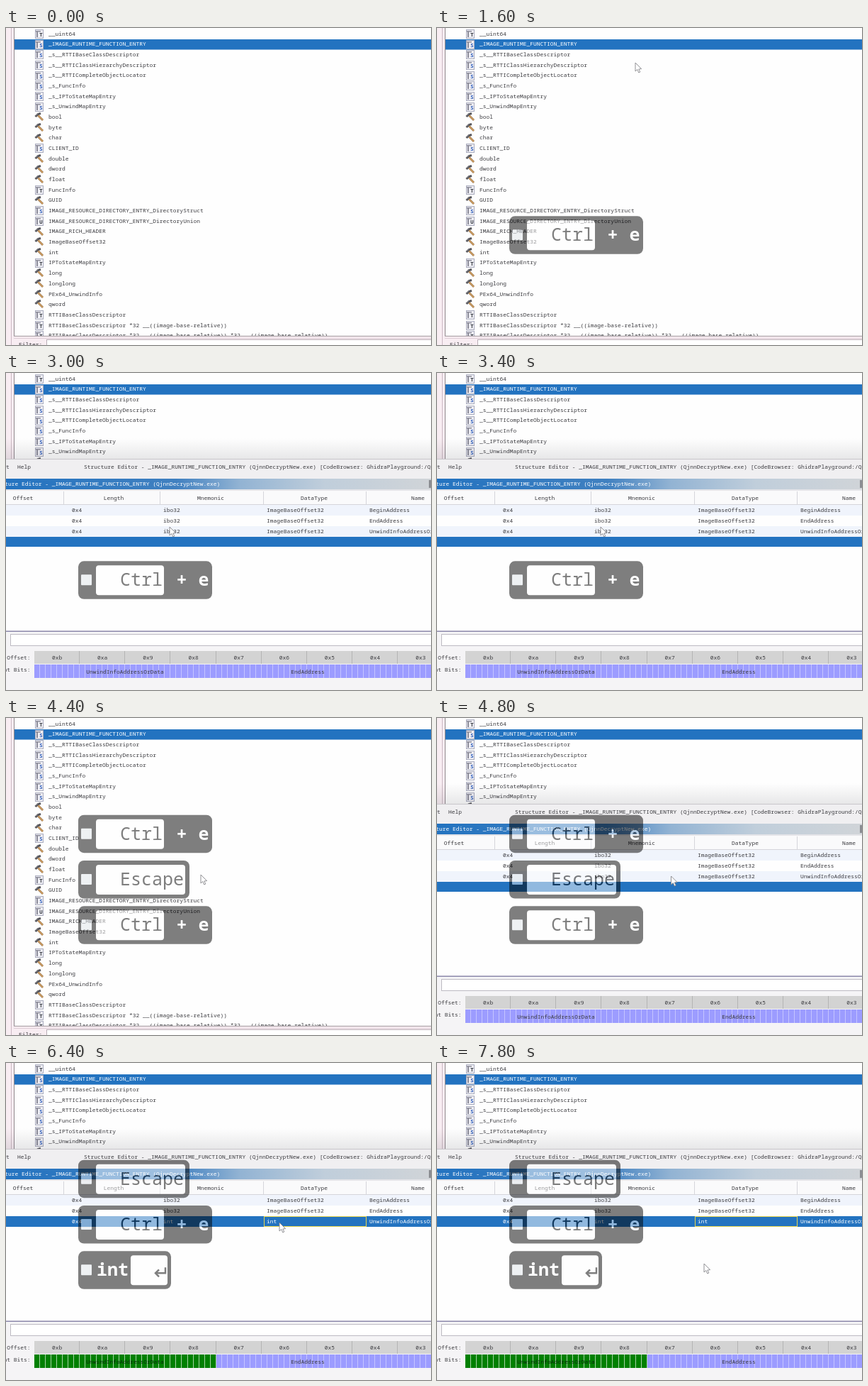
Recreate the animation shown at these times as an HTML page with a canvas. Size 600x447 px, loop 8000 ms.

```html
<!DOCTYPE html>
<html lang="en">
<head>
<meta charset="utf-8">
<title>Structure editor</title>
<style>
html, body { margin: 0; width: 100%; height: 100%; overflow: hidden; background: #fff; }
canvas { display: block; }
</style>
</head>
<body>
<canvas id="stage" width="600" height="447"></canvas>
<script>
const W = 600, H = 447, LOOP = 8000, STEP = 200;
const stage = document.getElementById('stage').getContext('2d');
const layer = document.createElement('canvas');
layer.width = W;
layer.height = H;
const overlay = layer.getContext('2d');
let ctx = stage;

const MONO = '"Noto Sans Mono", "DejaVu Sans Mono", monospace';
const BLUE = '#2373c0', INK = '#3c3c40', PITCH = 14.67;

// Icon letter (or h for a hammer), then the type name
const TYPES = `T __uint64
S _IMAGE_RUNTIME_FUNCTION_ENTRY
S _s__RTTIBaseClassDescriptor
S _s__RTTIClassHierarchyDescriptor
S _s__RTTICompleteObjectLocator
S _s_FuncInfo
S _s_IPToStateMapEntry
S _s_UnwindMapEntry
h bool
h byte
h char
S CLIENT_ID
h double
h dword
h float
T FuncInfo
h GUID
S IMAGE_RESOURCE_DIRECTORY_ENTRY_DirectoryStruct
U IMAGE_RESOURCE_DIRECTORY_ENTRY_DirectoryUnion
h IMAGE_RICH_HEADER
h ImageBaseOffset32
h int
T IPToStateMapEntry
h long
h longlong
h PEx64_UnwindInfo
h qword
T RTTIBaseClassDescriptor
T RTTIBaseClassDescriptor *32 __((image-base-relative))
T RTTIBaseClassDescriptor *32 __((image-base-relative)) *32 __((image-base-relative))`
  .split('\n').map(s => [s[0], s.slice(2)]);

// Pointer tip: time, x, y
const PATH = [
  [200, 430, -16], [1200, 280, 49], [1600, 280, 49], [2200, 224, 87],
  [2800, 231, 217], [3600, 231, 217], [4200, 275, 221], [4400, 275, 221],
  [5200, 386, 225], [7000, 386, 225], [7800, 377, 283]
];

function rect(x, y, w, h, color) {
  ctx.fillStyle = color;
  ctx.fillRect(x, y, w, h);
}

function frame(x, y, w, h, color) {
  ctx.strokeStyle = color;
  ctx.lineWidth = 1;
  ctx.strokeRect(x + 0.5, y + 0.5, w - 1, h - 1);
}

function round(x, y, w, h, r, color) {
  ctx.fillStyle = color;
  ctx.beginPath();
  ctx.roundRect(x, y, w, h, r);
  ctx.fill();
}

function text(s, x, y, color = INK, size = 7.93, align = 'left', weight = 400) {
  ctx.font = `${weight} ${size}px ${MONO}`;
  ctx.textAlign = align;
  ctx.textBaseline = 'middle';
  ctx.fillStyle = color;
  ctx.fillText(s, x, y);
}

const centered = (s, x, y, color) => text(s, x, y, color, 7.93, 'center');

function line(color, width, ...p) {
  ctx.strokeStyle = color;
  ctx.lineWidth = width;
  ctx.beginPath();
  for (let i = 0; i < p.length; i += 2) ctx.lineTo(p[i], p[i + 1]);
  ctx.stroke();
}

function hammer(y) {
  line('#8a6238', 2.6, 45, y - 2, 52, y + 5);
  line('#d9a868', 1.4, 45, y - 2, 52, y + 5);
  line('#54545a', 3, 41.5, y, 45, y - 3.5, 49, y - 4.5);
  line('#a5a5ab', 1, 42, y - 1.5, 45, y - 4.5);
}

function typeIcon(letter, y) {
  rect(41, y - 6, 12, 13, '#eeeef4');
  frame(41, y - 6, 12, 13, '#a9abbd');
  rect(43, y - 4, 2, 9, '#8c8c99');
  rect(42, y - 4, 7, 1.5, '#8c8c99');
  text(letter, 49.5, y + 2, letter === 'S' ? '#2456b8' : '#30343c', 7.2, 'center', 700);
}

function typeList() {
  rect(0, 0, W, H, '#fefefe');
  rect(0, 0, 12, H, '#f8edf2');
  rect(7, 0, 1, H, '#cbb9c3');
  rect(11, 0, 1, H, '#8f878c');
  rect(12, 16, W - 12, 14.5, BLUE);
  TYPES.forEach(([icon, name], i) => {
    const y = 8 + i * PITCH;
    icon === 'h' ? hammer(Math.round(y)) : typeIcon(icon, Math.round(y));
    text(name, 60, y + 0.5, i === 1 ? '#fff' : INK);
  });
  rect(11, 434, W, 13, '#f8edf2');
  rect(11, 434, W, 1, '#a39a9f');
  rect(11, 437, W, 1, '#dccbd4');
  rect(57, 439, W, 8, '#fff');
  frame(57, 439, W, 12, '#b9adb5');
  text('Filter:', 18, 446.5);
}

function tableRow(i, mnemonic, type, name, bg, color) {
  const top = Math.round(186.4 + i * 14.65), y = top + 7.5;
  rect(0, top, W, 15, bg);
  text('0x4', 93, y, color);
  text(mnemonic, 222, y, color);
  text(type, 368, y, color);
  text(name, 513, y, color);
}

function cellEditor(typed) {
  rect(364, 216, 146, 15, '#f1f1f1');
  rect(364, 216, 134, 14, '#fff');
  frame(364, 216, 134, 14, '#30323a');
  if (typed) {
    text(typed, 367, 223.5);
    rect(368 + typed.length * 4.76, 218, 1, 10, '#222');
  } else {
    rect(366, 218, 82, 10, BLUE);
    text('ImageBaseOffset32', 367, 223.5, '#fff');
  }
  text('..', 500, 223.5);
}

function bitView(selected) {
  rect(0, 363, W, 84, '#f5f4f6');
  rect(0, 363.5, W, 1.5, '#8d89ac');
  rect(6, 368, W, 17, '#fff');
  frame(6, 368, W, 17, '#bcbac2');
  text('Byte Offset:', 34.5, 401.5, INK, 7.93, 'right');
  text('Component Bits:', 34.5, 418.5, INK, 7.93, 'right');

  const byteW = 64.15;
  rect(40, 392, W, 18, '#d3d3d3');
  rect(40, 411, W, 19, '#9c9cff');
  if (selected) rect(40, 411, byteW * 4, 19, '#008000');
  for (let i = 0; i < 9; i++) {
    const x = 40 + i * byteW;
    rect(Math.round(x + byteW) - 1, 392, 1, 18, '#b4b4b4');
    centered('0x' + (11 - i).toString(16), x + byteW / 2, 401.5);
    for (let b = 1; b <= 8; b++) {
      const onGreen = selected && i < 4;
      rect(Math.round(x + b * byteW / 8) - 1, 411, 1, 19, onGreen ? '#a6d2a6' : '#c5c5ff');
    }
  }
  centered('UnwindInfoAddressOrData', 168, 421.5, selected ? '#0c2c10' : INK);
  centered('EndAddress', 426, 421.5);
}

function editor(t) {
  const picked = t >= 5200, done = t >= 6400;
  const title = 'Structure Editor - _IMAGE_RUNTIME_FUNCTION_ENTRY (QjnnDecryptNew.exe)';

  const shade = ctx.createLinearGradient(0, 92, 0, 122);
  shade.addColorStop(0, 'rgba(60,60,70,0)');
  shade.addColorStop(1, 'rgba(60,60,70,.12)');
  rect(0, 92, W, 30, shade);
  rect(0, 122, W, H - 122, '#fefefe');
  rect(0, 122, W, 27, '#f0eff1');
  rect(0, 121, W, 1, '#c9c7cb');
  text('t', 0, 133);
  text('Help', 16, 133);
  text(title + ' [CodeBrowser: GhidraPlayground:/Q', 110, 133);

  const bar = ctx.createLinearGradient(0, 0, W, 0);
  bar.addColorStop(0, BLUE);
  bar.addColorStop(0.4, '#4080c0');
  bar.addColorStop(0.55, '#92b3d3');
  bar.addColorStop(0.75, '#c0cedb');
  bar.addColorStop(1, '#d0d4d8');
  rect(0, 149, W, 15, bar);
  text(title, -25.6, 157, '#fff');
  rect(597, 151, 3, 11, '#8b8d92');

  rect(0, 164, W, 22, '#fafafb');
  rect(0, 164, W, 2, '#e4e4e8');
  rect(0, 185, W, 1, '#d5d5da');
  [81, 217, 363, 508].forEach(x => rect(x, 167, 1, 18, '#d5d5da'));
  [['Offset', 24], ['Length', 152], ['Mnemonic', 289], ['DataType', 435], ['Name', 581.5]]
    .forEach(([s, x]) => centered(s, x, 177));

  tableRow(0, 'ibo32', 'ImageBaseOffset32', 'BeginAddress', '#f0f4fc', INK);
  tableRow(1, 'ibo32', 'ImageBaseOffset32', 'EndAddress', '#fefefe', INK);
  const last = 'UnwindInfoAddressOrData';
  if (done) {
    tableRow(2, 'int', 'int', last, BLUE, '#fff');
    frame(364, 216, 145, 15, '#e6d44c');
  } else if (picked) {
    tableRow(2, 'ibo32', '', last, '#c3c3c3', INK);
    cellEditor('int'.slice(0, Math.max(0, (t - 5400) / STEP)));
  } else {
    tableRow(2, 'ibo32', 'ImageBaseOffset32', last, '#f0f4fc', INK);
    rect(0, 231, W, 14, BLUE);
  }
  bitView(picked);
}

function keyBox(slot, kind, typed) {
  const y = 136.7 + slot * 64.3;
  const widths = { combo: 189, escape: 157, word: 131 };
  const big = (s, x, color, weight = 500) =>
    text(s, x, y + 28, color, 25, 'left', weight);

  const w = kind === 'word' && typed.length < 4 ? 32 + typed.length * 15 : widths[kind];
  round(102, y, w, 53.5, 8, '#000');
  round(106, y + 19, 15, 15, 1, '#dfe5ea');
  if (kind === 'word') {
    big(typed.slice(0, 3), 128, '#fff', 600);
    if (typed.length > 3) {
      round(176, y + 6, 52, 42, 4, '#fff');
      line('#000', 2.5, 225, y + 23, 225, y + 31, 211, y + 31);
      line('#000', 2.5, 216, y + 26, 211, y + 31, 216, y + 36);
    }
  } else {
    const combo = kind === 'combo';
    round(127, y + 6, combo ? 96 : 126, 42, 4, '#fff');
    big(combo ? 'Ctrl' : 'Escape', 161, '#000');
    if (combo) {
      big('+', 240.5, '#fff', 600);
      big('e', 271.5, '#fff', 600);
    }
  }
}

// The key boxes are drawn opaque on their own layer, then laid over at half strength
function keys(t) {
  const shown = [];
  if (t >= 1400) shown.push('combo');
  if (t >= 3800) shown.push('escape');
  if (t >= 4200) shown.push('combo');
  if (t >= 5600) shown.push('word');
  const typed = 'int\n'.slice(0, Math.max(0, Math.floor((t - 5400) / STEP)));
  const last = shown.slice(-3);

  ctx = overlay;
  ctx.clearRect(0, 0, W, H);
  last.forEach((kind, i) => keyBox(3 - last.length + i, kind, typed));
  ctx = stage;
  ctx.globalAlpha = 0.5;
  ctx.drawImage(layer, 0, 0);
  ctx.globalAlpha = 1;
}

function pointerAt(t) {
  const i = PATH.findIndex(p => p[0] >= t);
  if (i < 0) return PATH[PATH.length - 1].slice(1);
  if (i === 0) return PATH[0].slice(1);
  const [t0, x0, y0] = PATH[i - 1], [t1, x1, y1] = PATH[i];
  const u = (t - t0) / (t1 - t0), e = u * u * (3 - 2 * u);
  return [x0 + (x1 - x0) * e, y0 + (y1 - y0) * e];
}

function arrow(x, y) {
  ctx.save();
  ctx.translate(x, y);
  ctx.beginPath();
  [[0, 0], [0, 12], [2.8, 9.5], [4.8, 14], [6.8, 13], [4.8, 9], [8.6, 8.6]]
    .forEach(p => ctx.lineTo(...p));
  ctx.closePath();
  ctx.fillStyle = '#fff';
  ctx.fill();
  ctx.strokeStyle = '#85858a';
  ctx.lineWidth = 0.9;
  ctx.stroke();
  ctx.restore();
}

function beam(x, y) {
  for (const [color, width] of [['#fff', 3], ['#55585e', 1.2]]) {
    line(color, width, x, y - 5, x, y + 6);
    line(color, width, x - 3, y - 5, x + 3, y - 5);
    line(color, width, x - 3, y + 6, x + 3, y + 6);
  }
}

function pointer(t) {
  if (t < 200) return;
  const [x, y] = pointerAt(t);
  const editing = t >= 5200 && t < 6400;
  editing ? beam(x, y) : arrow(x, y);
  if (editing && t < 5600) {
    ctx.strokeStyle = '#f0672f';
    ctx.lineWidth = 1.8;
    ctx.beginPath();
    ctx.arc(x, y, 13.5, 0, Math.PI * 2);
    ctx.stroke();
  }
}

function draw(t) {
  typeList();
  if ((t >= 2000 && t < 3800) || t >= 4600) editor(t);
  keys(t);
  pointer(t);
}

const start = performance.now();
function tick() {
  const t = (performance.now() - start) % LOOP;
  draw(Math.floor(t / STEP) * STEP);
  requestAnimationFrame(tick);
}
tick();
</script>
</body>
</html>
```
